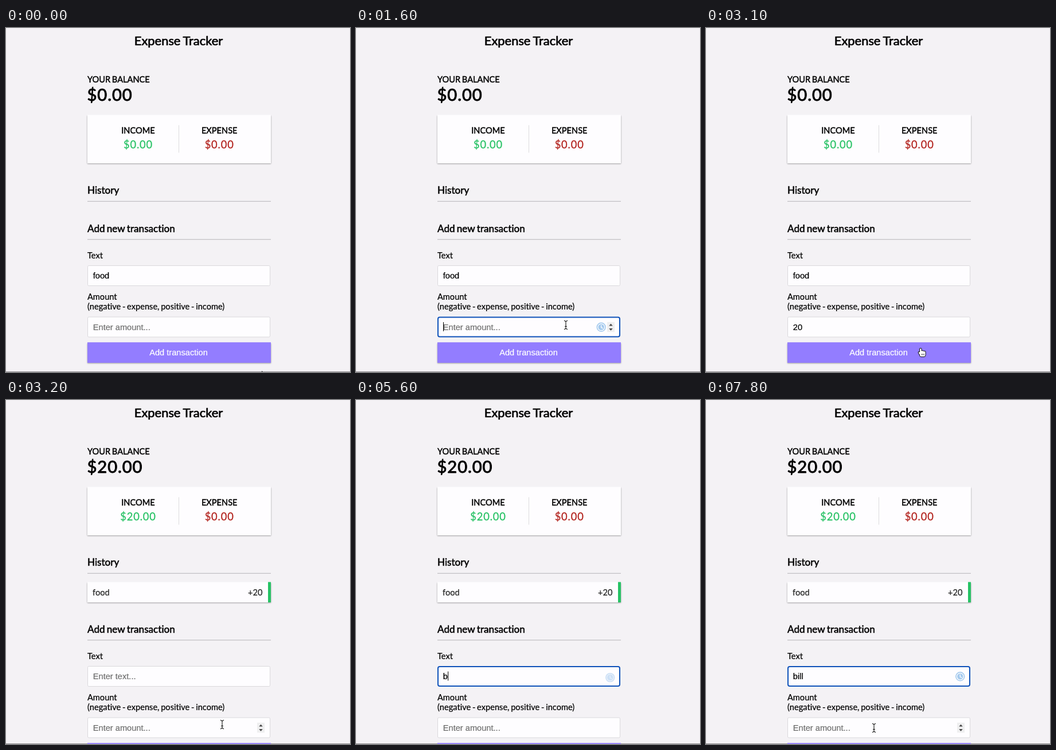
Write an HTML page with a canvas that moves like this. It is 600 px wide and 600 px high and loops after 8 s.

```html
<!DOCTYPE html>
<html lang="en">
<head>
<meta charset="utf-8">
<title>Expense Tracker</title>
<style>
html, body { margin: 0; width: 100%; height: 100%; overflow: hidden; background: #f4f2f5; }
canvas { display: block; }
</style>
</head>
<body>
<canvas id="stage" width="600" height="600"></canvas>
<script>
const c = document.getElementById('stage').getContext('2d');
const LOOP = 8000, STEP = 100;
const LEFT = 142, WIDTH = 320, RIGHT = LEFT + WIDTH, MIDDLE = 301;
const TEXT_Y = 414, AMOUNT_Y = 503.5, BUTTON_Y = 548.5, FIELD_H = 36, ITEM_H = 35.5;
const LATO = 'Lato, sans-serif', ARIAL = '"Liberation Sans", Arial, sans-serif';
const PAPER = '#fefdff', GREEN = '#27c265', RED = '#b3241f';

// Event times in ms
const FOCUS_AMOUNT = 600, BLUR = 3000, ADDED = 3200, FOCUS_TEXT = 5400;
const AMOUNT_KEYS = [1800, 2000], TEXT_KEYS = [5600, 6400, 6800, 7000];
const START = { x: 446, y: 598 }, TRAVEL = 400;
const MOVES = [
  { at: 100, x: 366, y: 518 },
  { at: 2600, x: 377, y: 566 },
  { at: 3750, x: 357, y: 499.5 },
  { at: 7400, x: 293, y: 572 }
];

const clamp = v => Math.max(0, Math.min(1, v));
const smooth = u => u * u * (3 - 2 * u);

function text(str, x, y, { size = 14.6, font = LATO, color = '#000', align = 'left', bold = false, gap = .01 } = {}) {
  c.font = `${size}px ${font}`;
  c.textAlign = align;
  c.letterSpacing = gap + 'px'; // any spacing also turns ligatures off
  c.wordSpacing = (font === LATO ? -.07 * size : 0) + 'px';
  c.fillStyle = c.strokeStyle = color;
  c.lineWidth = size * (bold ? .032 : .016);
  c.lineJoin = 'round';
  c.fillText(str, x, y);
  c.strokeText(str, x, y);
}

function rect(x, y, w, h, color) {
  c.fillStyle = color;
  c.fillRect(x, y, w, h);
}

function line(color, width, ...points) {
  c.beginPath();
  points.forEach(p => c.lineTo(...p));
  c.strokeStyle = color;
  c.lineWidth = width;
  c.stroke();
}

function card(y, h, color = PAPER) {
  c.save();
  c.shadowOffsetY = 1;
  for (const blur of [2, 3]) {
    c.shadowColor = `rgba(0,0,0,${.5 / blur})`;
    c.shadowBlur = blur;
    rect(LEFT, y, WIDTH, h, color);
  }
  c.restore();
}

function heading(str, y) {
  text(str, LEFT, y, { size: 17.1, bold: true });
  rect(LEFT, y + 12.7, WIDTH, 1, '#b5b4b7');
}

function column(title, amount, x, color) {
  text(title, x, 184.2, { align: 'center', bold: true });
  text(amount, x, 209.7, { size: 18.26, color, align: 'center', gap: .9 });
}

function clock(x, y, shown) {
  c.save();
  c.globalAlpha = shown;
  c.translate(x, y + 4 * (1 - shown));
  c.beginPath();
  c.arc(0, 0, 8.2, 0, 7);
  c.fillStyle = '#a5caee';
  c.fill();
  c.beginPath();
  c.arc(0, 0, 5.9, 0, 7);
  c.strokeStyle = '#fff';
  c.lineWidth = 1.3;
  c.stroke();
  line('#fff', 1.3, [0, -3.5], [0, .5], [3, 2]);
  c.restore();
}

function spinner(y) {
  rect(438, y - 9, 13, 17.5, '#efeff0');
  for (const s of [-1, 1]) {
    c.beginPath();
    for (const x of [-1, 0, 1]) c.lineTo(444.5 + 3.2 * x, y + s * (x ? 2.2 : 6));
    c.fillStyle = '#444';
    c.fill();
  }
}

// focus: ms since the field was focused, negative when it is not
function field(y, { value, since }, hint, focus, number, hover) {
  const on = focus >= 0, border = on ? 2 : 1, mid = y + FIELD_H / 2;
  c.beginPath();
  c.roundRect(LEFT + border / 2, y + border / 2, WIDTH - 1 - border, FIELD_H - border, border + 1);
  c.fillStyle = PAPER;
  c.fill();
  c.strokeStyle = on ? '#0f52b9' : '#dad9dc';
  c.lineWidth = border;
  c.stroke();
  text(value || hint, 151.8, mid + 5, { font: ARIAL, color: value ? '#000' : '#707070' });
  if (on) {
    const caret = 152 + (value ? c.measureText(value).width : 0);
    if (Math.min(focus, since) % 1000 < 500) rect(caret, mid - 8.5, 1, 16, '#000');
    clock(number ? 427.7 : 443.3, mid + .3, clamp((focus + 50) / 450));
  }
  if (number && (on || hover)) spinner(mid + .3);
}

function typed(word, keys, t) {
  const n = keys.filter(k => t >= k).length;
  return { value: word.slice(0, n), since: n ? t - keys[n - 1] : Infinity };
}

function pointerAt(t) {
  return MOVES.reduce((p, m) => {
    const u = smooth(clamp((t - m.at) / TRAVEL));
    return { x: p.x + (m.x - p.x) * u, y: p.y + (m.y - p.y) * u };
  }, START);
}

// Typing hides the pointer until it next moves
function pointerHidden(t) {
  return [AMOUNT_KEYS, TEXT_KEYS].some(([first]) =>
    t >= first && t < MOVES.find(m => m.at > first).at);
}

function beam() {
  for (const [color, width] of [['#fff', 2.4], ['#111', 1.1]]) {
    for (const s of [-1, 1]) {
      line(color, width, [-3, 7.7 * s], [0, 6.2 * s], [3, 7.7 * s]);
    }
    line(color, width, [0, -6.5], [0, 6.5]);
    line(color, width, [-1.8, 2.5], [1.8, 2.5]);
  }
}

function hand() {
  const shape = new Path2D();
  shape.roundRect(-4, -7, 2.6, 10, 1.3);
  for (let i = 0; i < 3; i++) shape.roundRect(-1.4 + i * 2.2, -3 + i * .5, 2.6, 7, 1.3);
  shape.roundRect(-4, -.5, 9.4, 7.5, 2.5);
  shape.ellipse(-4.2, 1.5, 1.4, 2.8, -.6, 0, 7);
  c.strokeStyle = '#111';
  c.lineWidth = 2;
  c.stroke(shape);
  c.fillStyle = '#fff';
  c.fill(shape);
  for (let x = -.8; x < 4; x += 2) line('#222', .7, [x, 2], [x, 5]);
}

function arrow() {
  c.beginPath();
  c.lineTo(0, 0);
  c.lineTo(0, 14);
  c.lineTo(10, 10);
  c.closePath();
  c.fillStyle = '#111';
  c.fill();
}

function summary(total) {
  text('Expense Tracker', MIDDLE, 29.8, { size: 21.9, align: 'center', bold: true });
  text('YOUR BALANCE', LEFT, 94.7, { bold: true });
  text(total, LEFT - .5, 126.6, { size: 29.2, bold: true, gap: .9 });
  card(151.5, 84.5);
  rect(MIDDLE, 169.5, 1, 48, '#dcdbde');
  column('INCOME', total, 230.5, GREEN);
  column('EXPENSE', '$0.00', 372.2, RED);
}

function history(added) {
  heading('History', 289.1);
  if (!added) return;
  card(317.5, ITEM_H);
  rect(RIGHT - 5, 317.5, 5, ITEM_H, GREEN);
  text('food', 151, 341, { color: '#222' });
  text('+20', 447.5, 341, { color: '#222', align: 'right' });
}

function form(t, added, hoverAmount) {
  const name = added ? typed('bill', TEXT_KEYS, t) : { value: 'food' };
  const amount = typed(added ? '' : '20', AMOUNT_KEYS, t);
  heading('Add new transaction', 355.6);
  text('Text', LEFT, 402.2);
  field(TEXT_Y, name, 'Enter text...', t - FOCUS_TEXT, false, false);
  text('Amount', LEFT, 474);
  text('(negative - expense, positive - income)', LEFT, 491.4);
  field(AMOUNT_Y, amount, 'Enter amount...', t < BLUR ? t - FOCUS_AMOUNT : -1, true, hoverAmount);
  card(BUTTON_Y, ITEM_H, '#937dff');
  text('Add transaction', MIDDLE, 570.8, { font: ARIAL, color: '#fff', align: 'center' });
}

function draw(t) {
  const added = t >= ADDED, shift = added ? 50 : 0;
  const pointer = pointerAt(t), visible = !pointerHidden(t);
  const over = y => visible && pointer.y >= y + shift && pointer.y <= y + shift + FIELD_H;

  rect(0, 0, 600, 600, '#f4f2f5');
  rect(0, 599, 600, 1, '#8b8a8d');
  summary(added ? '$20.00' : '$0.00');
  history(added);
  c.save();
  c.translate(0, shift);
  form(t, added, over(AMOUNT_Y));
  c.restore();

  if (!visible) return;
  c.save();
  c.translate(pointer.x, pointer.y);
  if (over(BUTTON_Y)) hand();
  else if (over(AMOUNT_Y) || over(TEXT_Y)) beam();
  else arrow();
  c.restore();
}

function tick() {
  const t = performance.now() % LOOP;
  draw(Math.floor(t / STEP) * STEP);
  requestAnimationFrame(tick);
}
tick();
</script>
</body>
</html>
```
